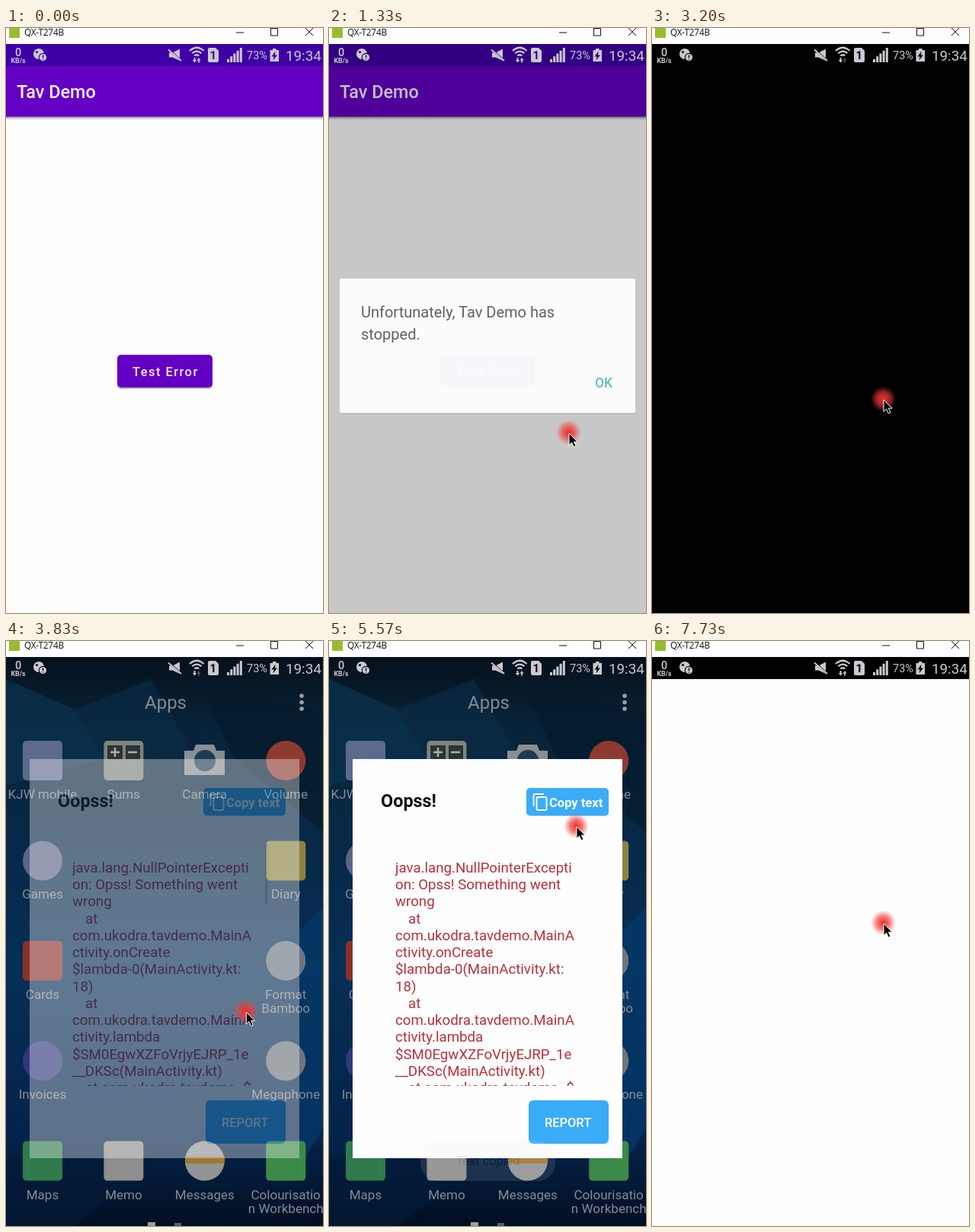
These frames come from a looping animation (416 px wide and 768 px high, 8 s). An HTML page:

```html
<!DOCTYPE html>
<html lang="en">
<head>
<meta charset="utf-8">
<title>Crash dialog demo</title>
<style>
html, body { margin: 0; width: 100%; height: 100%; overflow: hidden; background: #fefefe; }
svg { display: block; width: 100vw; height: 100vh; }
text { font-family: Roboto, "Open Sans", sans-serif; white-space: pre; }
.m { font-weight: 500; }
.b { font-weight: 700; }
.mid { text-anchor: middle; }
#status { fill: #ccc8d0; stroke: none; }
#status .line { fill: none; stroke: #ccc8d0; }
#status .hole { fill: var(--hole); }
</style>
</head>
<body>
<svg viewBox="0 0 416 768" xmlns="http://www.w3.org/2000/svg">
<defs>
  <radialGradient id="red">
    <stop offset="0" stop-color="#f02a2a"/>
    <stop offset=".5" stop-color="#f03a36" stop-opacity=".68"/>
    <stop offset="1" stop-color="#f04a44" stop-opacity="0"/>
  </radialGradient>
  <radialGradient id="yellow">
    <stop offset="0" stop-color="#fff200"/>
    <stop offset=".5" stop-color="#fff200" stop-opacity=".75"/>
    <stop offset="1" stop-color="#fff200" stop-opacity="0"/>
  </radialGradient>
  <linearGradient id="blue" x1="0" y1="0" x2="0" y2="1">
    <stop offset="0" stop-color="#06101c"/>
    <stop offset=".12" stop-color="#082338"/>
    <stop offset=".55" stop-color="#062e56"/>
    <stop offset=".85" stop-color="#04234a"/>
    <stop offset="1" stop-color="#020f22"/>
  </linearGradient>
  <linearGradient id="shade" x1="0" y1="0" x2="0" y2="1">
    <stop offset="0" stop-opacity=".4"/>
    <stop offset="1" stop-opacity="0"/>
  </linearGradient>
  <clipPath id="log"><rect x="80" y="264" width="262" height="320"/></clipPath>
</defs>

<g id="app">
  <rect y="21" width="416" height="747" fill="#fefefe"/>
  <rect y="116" width="416" height="5" fill="url(#shade)"/>
  <rect y="50" width="416" height="66.5" fill="#6400c4"/>
  <rect y="21" width="416" height="29" fill="#3e00a4"/>
  <text class="m" x="14" y="92" font-size="23.4" fill="#faf4fc">Tav Demo</text>
  <rect x="146" y="432" width="125" height="42" rx="5" opacity=".25"/>
  <rect x="146" y="429" width="125" height="43" rx="5" fill="#fff"/>
  <rect id="testBtn" x="146" y="429" width="125" height="43" rx="5" fill="#6400c4"/>
  <text class="m" x="166" y="457" font-size="16.4" letter-spacing="1.5" fill="#f6eefa">Test Error</text>
  <rect id="dim" y="21" width="416" height="747"/>
</g>

<g id="stopped">
  <rect x="14" y="331" width="388" height="176" rx="2" opacity=".12"/>
  <rect x="14" y="329" width="388" height="176.5" rx="2" fill="#fefefe"/>
  <g id="message">
    <text font-size="20" fill="#222"><tspan x="42" y="380">Unfortunately, Tav Demo has</tspan><tspan x="42" y="409">stopped.</tspan></text>
    <text id="ok" class="m" x="349" y="472" font-size="17.5" fill="#2aa0a6">OK</text>
  </g>
</g>

<rect id="black" y="21" width="416" height="747"/>

<g id="drawer">
  <rect y="21" width="416" height="747" fill="url(#blue)"/>
  <g opacity=".7">
    <path d="M0 50 90 90 130 155 0 190Z" fill="#0a3350"/>
    <path d="M90 90 190 50 250 155H130Z" fill="#0a2b45"/>
    <path d="M250 50 416 95V250L300 155Z" fill="#051a2c"/>
    <path d="M385 380 416 350V640L385 690Z" fill="#063a6c"/>
    <path d="M0 679H200L90 768H0Z" fill="#041a38"/>
  </g>
  <text x="182" y="89" font-size="24" fill="#858b90">Apps</text>
  <path d="M388 72v18" stroke="#9aa0a4" stroke-width="5.6" stroke-linecap="round" stroke-dasharray="0 8.5"/>
  <g id="icons"></g>
  <path d="M133 137h20v18h-20zM157 137h19v18h-19z" fill="#2e3434"/>
  <path d="M137 146h12M143 140v12M160 146h12" stroke="#aab0aa" stroke-width="2.5"/>
  <path d="M234 144h12l3-8h24l3 8h11v32h-53z" fill="#888e92"/>
  <circle cx="261" cy="157" r="14" fill="#1c3c54"/>
  <path d="M235 677h52v9h-52z" fill="#a07830"/>
  <g id="labels" class="mid" font-size="17" fill="#858b92"></g>
  <path d="M186 763h10v5h-10z" fill="#9ba0a5"/>
  <path d="M221 764h9v4h-9z" fill="#4f6070"/>
</g>

<g id="report">
  <rect x="31" y="155" width="354" height="524" fill="#fefefe"/>
  <text class="b" x="68" y="218" font-size="23.4" fill="#101010">Oopss!</text>
  <rect id="copyBtn" x="259" y="193" width="108" height="36.5" rx="5" fill="#3aacf8"/>
  <g fill="none" stroke="#fff" stroke-width="1.9"><rect x="272.5" y="205" width="13" height="17" rx="1.5"/><path d="M268.500 217V202.500q0-1.500 1.500-1.500h12"/></g>
  <text class="b" x="289" y="218" font-size="16.5" fill="#fff">Copy text</text>
  <g clip-path="url(#log)"><g id="trace" font-size="18.7" fill="#b8303a"></g></g>
  <rect id="scroll" x="340" y="267" width="3.5" height="79" fill="#d2d2d2"/>
  <rect id="sendBtn" x="262" y="603" width="105" height="57" rx="6" fill="#3aacf8"/>
  <text class="m" x="283" y="638" font-size="16.4" fill="#fff">REPORT</text>
</g>

<g id="toast">
  <rect x="120" y="656" width="177" height="53" rx="24" fill="#e4e4e4"/>
  <text class="mid" x="208.5" y="688" font-size="16.4" fill="#303030">Text copied</text>
</g>

<g id="blank">
  <rect y="50" width="416" height="718" fill="#fefefe"/>
  <rect y="21" width="416" height="29"/>
</g>

<g id="status">
  <text class="m mid" x="16" y="37" font-size="14.5">0</text>
  <text class="b mid" x="16" y="45.5" font-size="8.8">KB/s</text>
  <circle cx="43" cy="34" r="7"/><circle class="hole" cx="40.5" cy="31.5" r="1.6"/>
  <circle class="hole" cx="48.5" cy="38.5" r="5.8"/><circle cx="48.5" cy="38.5" r="4.6"/>
  <path class="hole" d="M47.8 35.5h1.5v3.600h-1.500zM47.800 40.200h1.500v1.400h-1.500z"/>
  <path d="M214 32.500h4.500L228 27.500V43L218.500 38.500H214z"/>
  <path class="hole" d="M214 27 231 42 229.500 44 212.500 29z"/>
  <path class="line" d="M213 28.500 230 43" stroke-width="1.8"/>
  <path class="line" d="M241 30q9.500-8.500 18.500 0M244.300 33.300q6-5.500 12 0M247.300 36.500q3-2.500 6 0" stroke-width="2.200"/>
  <path d="M246.500 39h2v3h1.700l-2.700 3.500-2.700-3.500h1.700z"/>
  <path id="upArrow" d="M252 45.500h2v-3h1.700L253 39l-2.700 3.500h1.700z"/>
  <path d="M265 28q0-2 2-2h8l4 4v13q0 2-2 2h-10q-2 0-2-2z"/>
  <text class="b hole mid" x="271.800" y="41" font-size="15">1</text>
  <g id="signal"></g>
  <text x="316" y="41" font-size="14.5">73%</text>
  <path d="M346.500 29h3.500v-2h4.500v2h3.500v15h-11.500z"/>
  <path class="hole" d="M353.500 30.500 348.500 37.500h3L350.500 42.500 356 35.500h-3z"/>
  <text x="367" y="42.5" font-size="18.8">19:34</text>
</g>

<g>
  <rect width="416" height="21" fill="#fefefe"/>
  <rect x="4" y="0" width="14" height="13" fill="#98bd2c"/>
  <text x="24" y="10" font-size="11.8" style="font-family:'Open Sans',sans-serif" fill="#111" letter-spacing="-.2">QX-T274B</text>
  <path d="M302 6h10M347.500 0v10h9V0.500h-9M393 0l10 10M403 0l-10 10" fill="none" stroke="#111"/>
</g>

<g id="cursor">
  <circle id="halo" cx="-.5" cy="-1" r="16.5"/>
  <path d="M0 0V15.500L3.600 12.200 6.200 18 9 16.700 6.400 11.200H11.200Z" stroke="#fff"/>
</g>
</svg>

<script>
const LOOP = 8000;
const $ = id => document.getElementById(id);
const set = (id, name, v) => $(id).setAttribute(name, v);
const show = (id, v) => set(id, 'opacity', v.toFixed(3));
const ramp = (t, a, b) => Math.min(1, Math.max(0, (t - a) / (b - a)));
const smooth = p => p * p * (3 - 2 * p);
const within = (t, a, b) => t >= a && t < b;

function add(parent, tag, attrs, str = '') {
  const el = document.createElementNS('http://www.w3.org/2000/svg', tag);
  for (const k in attrs) el.setAttribute(k, attrs[k]);
  el.textContent = str;
  $(parent).append(el);
}

// Launcher grid: column, row, label, colour, and whether the icon is round.
[
  [0, 0, 'KJW mobile', '#5c6a8e'], [1, 0, 'Sums', '#7c847e'], [2, 0, 'Camera', 'none'], [3, 0, 'Volume', '#8e3a30', true],
  [0, 1, 'Games', '#5c6488', true], [3, 1, 'Diary', '#8b8240'],
  [0, 2, 'Cards', '#8a2f2c'], [3, 2, 'Format\nBamboo', '#6c7680', true],
  [0, 3, 'Invoices', '#30387c', true], [3, 3, 'Megaphone', '#6e767c', true],
  [0, 4, 'Maps', '#307a4d'], [1, 4, 'Memo', '#8e8e8c'], [2, 4, 'Messages', '#929496', true],
  [3, 4, 'Colourisatio\nn Workbench', '#3b8a48']
].forEach(([col, row, label, fill, round]) => {
  const x = 48 + col * 106.4, y = 157 + row * 131.4;
  add('icons', 'rect', { x: x - 26, y: y - 26, width: 52, height: 52, rx: round ? 26 : 5, fill });
  label.split('\n').forEach((s, i) => add('labels', 'text', { x, y: y + 50 + i * 18 }, s));
});

const pkg = 'com.ukodra.tavdemo.';
[
  'java.lang.NullPointerExcepti', 'on: Opss! Something went', 'wrong', '    at',
  pkg + 'MainA', 'ctivity.onCreate', '$lambda-0(MainActivity.kt:', '18)', '    at',
  pkg + 'MainA', 'ctivity.lambda', '$SM0EgwXZFoVrjyEJRP_1e', '__DKSc(MainActivity.kt)', '    at ' + pkg + '-$'
].forEach((s, i) => add('trace', 'text', { x: s[0] === ' ' ? 104 : 87, y: 304 + i * 22.23 }, s.trim()));

for (let i = 0; i < 5; i++) {
  add('signal', 'rect', { x: 290 + i * 4.2, y: 41 - i * 3.75, width: 3, height: 4 + i * 3.75 });
}

// Pointer moves: start, end, x, y, and the control clicked on arrival.
const moves = [
  [100, 560, 238, 456, 'testBtn'], [930, 1290, 315, 532], [1730, 2080, 358, 461, 'ok'],
  [2600, 3150, 304, 488], [3600, 4250, 343, 486], [4380, 5000, 316, 213, 'copyBtn'],
  [5400, 5580, 325, 244], [5750, 6650, 314, 632, 'sendBtn'], [7080, 7680, 304, 371]
];

function drawPointer(t) {
  let x = 430, y = 562, pressed = false;
  for (const [a, b, toX, toY, target] of moves) {
    const p = smooth(ramp(t, a, b));
    x += (toX - x) * p;
    y += (toY - y) * p;
    if (!target) continue;
    const down = within(t, b + 130, b + 330);
    pressed = pressed || down;
    set(target, 'fill-opacity', down ? .8 : 1);
  }
  show('cursor', t < 100 ? 0 : 1);
  set('cursor', 'transform', `translate(${x.toFixed(2)} ${y.toFixed(2)})`);
  set('halo', 'fill', pressed ? 'url(#yellow)' : 'url(#red)');
}

function draw(t) {
  const alert = ramp(t, 1230, 1370);
  show('dim', .3 * alert);
  show('message', alert);
  show('stopped', ramp(t, 1220, 1334) * (1 - ramp(t, 2620, 2760)));
  show('black', ramp(t, 2760, 2950));
  show('drawer', ramp(t, 3560, 3800));
  show('report', ramp(t, 3760, 3960));
  show('scroll', 1 - ramp(t, 4420, 4680));
  show('toast', .95 * ramp(t, 5540, 5800) * (1 - ramp(t, 6900, 7100)));
  show('blank', ramp(t, 7120, 7340));
  show('upArrow', within(t, 1800, 4300) ? .35 : .9);
  $('status').style.setProperty('--hole', t < 1300 ? '#3e00a4' : t < 2800 ? '#2b0072' : '#080c12');
  drawPointer(t);
}

const start = performance.now();
function tick() {
  draw((performance.now() - start) % LOOP);
  requestAnimationFrame(tick);
}
tick();
</script>
</body>
</html>
```
